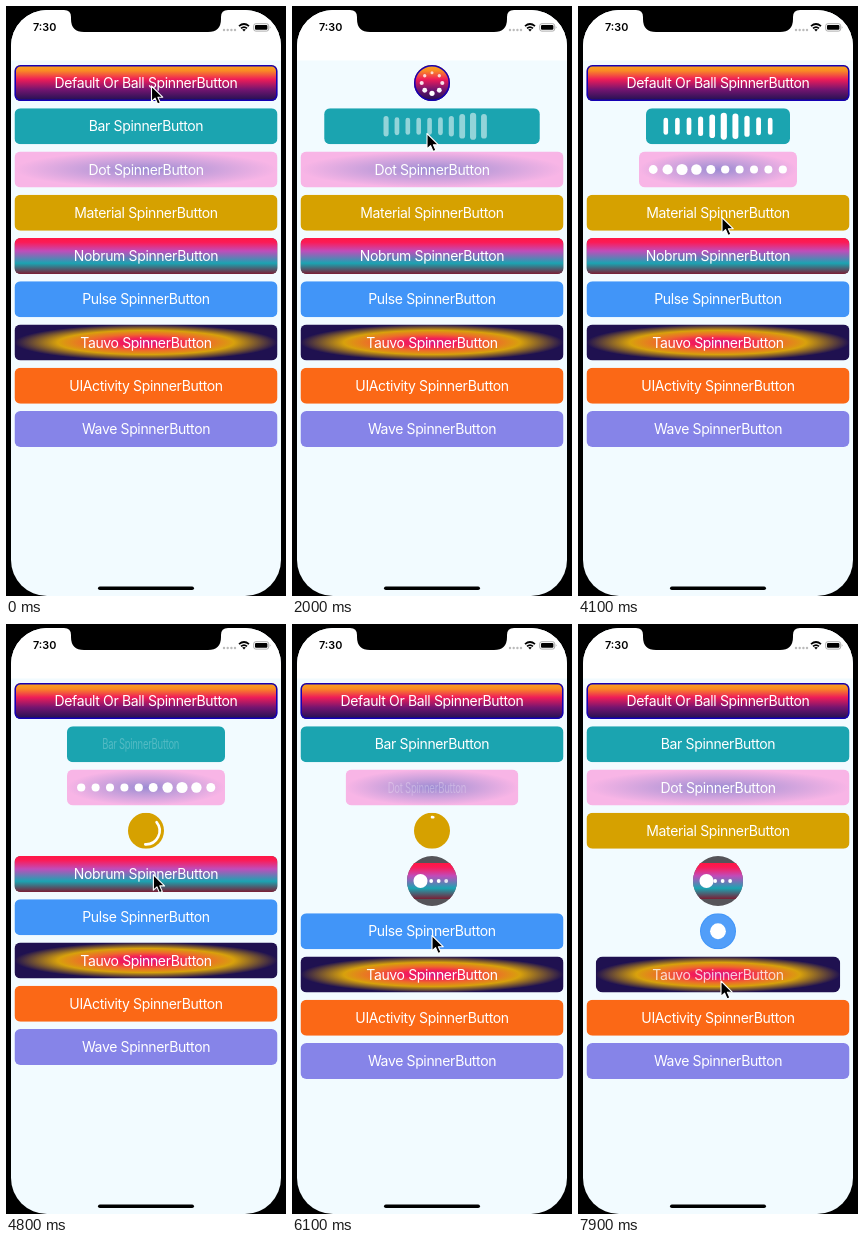
These frames come from a looping animation (280 px wide and 590 px high, 8 s). An HTML page:

```html
<!DOCTYPE html>
<html lang="en">
<head>
<meta charset="utf-8">
<title>Spinner buttons</title>
<style>
  html, body { margin: 0; width: 100%; height: 100%; overflow: hidden; background: #000; }
  svg { display: block; width: 280px; height: 590px; }
  text { font-family: Inter, Roboto, sans-serif; }
  .label { font-size: 14px; letter-spacing: -.36px; fill: #fff; text-anchor: middle; }
</style>
</head>
<body>
<svg id="stage" viewBox="0 0 280 590">
  <defs>
    <linearGradient id="sunset" x2="0" y2="1">
      <stop offset="0" stop-color="#f9a81c"/><stop offset=".16" stop-color="#f98a25"/>
      <stop offset=".4" stop-color="#ee1c58"/><stop offset=".68" stop-color="#741570"/>
      <stop offset="1" stop-color="#1d1150"/>
    </linearGradient>
    <linearGradient id="candy" x2="0" y2="1">
      <stop offset="0" stop-color="#ff1744"/><stop offset=".12" stop-color="#fb1b57"/>
      <stop offset=".36" stop-color="#c04cba"/><stop offset=".7" stop-color="#1ba4b2"/>
      <stop offset="1" stop-color="#7a1f35"/>
    </linearGradient>
    <radialGradient id="lilac">
      <stop offset="0" stop-color="#9c8bd3"/><stop offset=".35" stop-color="#bd9bd9"/>
      <stop offset="1" stop-color="#f8b5e6"/>
    </radialGradient>
    <radialGradient id="flare">
      <stop offset="0" stop-color="#d51b86"/><stop offset=".22" stop-color="#f31d58"/>
      <stop offset=".45" stop-color="#ee6a2b"/><stop offset=".67" stop-color="#d8a10c"/>
      <stop offset="1" stop-color="#1f1150"/>
    </radialGradient>
    <clipPath id="screen"><rect x="5" y="4" width="270" height="586" rx="36"/></clipPath>
  </defs>
  <rect width="280" height="590"/>
  <g clip-path="url(#screen)">
    <rect width="280" height="590" fill="#f2fbff"/>
    <rect width="280" height="54.5" fill="#fff"/>
  </g>
  <path d="M58 0V4Q65 4 65 11V13Q65 26 78 26H202Q215 26 215 13V11Q215 4 222 4V0Z"/>
  <text x="27" y="25.3" font-size="10.8" font-weight="600">7:30</text>
  <g fill="#bbb">
    <circle cx="218" cy="24" r="1.2"/><circle cx="221.7" cy="24" r="1.2"/>
    <circle cx="225.4" cy="24" r="1.2"/><circle cx="229" cy="24" r="1.2"/>
  </g>
  <g fill="none" stroke="#000" stroke-width="1.7">
    <path d="M233 20.2Q238 15.8 243 20.2M235 22.4Q238 19.8 241 22.4"/>
  </g>
  <path d="M236.2 23.6Q238 22.2 239.8 23.6L238 25.6Z"/>
  <rect x="247.7" y="17.7" width="15" height="7.4" rx="2.1" fill="none" stroke="#999" stroke-width=".8"/>
  <rect x="249" y="19" width="12.4" height="4.8" rx="1.1"/>
  <path d="M263.8 20Q265.3 21.4 263.8 22.8Z" fill="#999"/>
  <g id="buttons"></g>
  <rect x="92" y="580.5" width="96" height="3.6" rx="1.8"/>
  <path id="cursor" d="M0 0V15.5L3.6 12.2L6.1 18L8.9 16.8L6.4 11.2H11.2Z"
        stroke="#fff" stroke-width="1.1" stroke-linejoin="round"/>
</svg>
<script>
const LOOP = 8, MORPH = 0.5, BUSY = 2.9, FULL = 263, HEIGHT = 36, PITCH = 43.25, MID = 140;

const clamp = v => Math.max(0, Math.min(1, v));
const mix = (a, b, k) => a + (b - a) * k;
const wrap = (v, n) => ((v % n) + n) % n;
const polar = (r, deg) => [r * Math.cos(deg * Math.PI / 180), r * Math.sin(deg * Math.PI / 180)];

function bezier(x1, y1, x2, y2) {
  const at = (a, b, s) => 3 * a * s * (1 - s) ** 2 + 3 * b * s * s * (1 - s) + s ** 3;
  return x => {
    let lo = 0, hi = 1;
    for (let i = 0; i < 20; i++) {
      const s = (lo + hi) / 2;
      if (at(x1, x2, s) < clamp(x)) lo = s; else hi = s;
    }
    return at(y1, y2, lo);
  };
}
const easeInOut = bezier(.42, 0, .58, 1);
const strokeEase = bezier(.4, 0, .2, 1);

function add(parent, tag, attrs = {}) {
  const node = document.createElementNS('http://www.w3.org/2000/svg', tag);
  parent.append(node);
  return set(node, attrs);
}
function set(node, attrs) {
  for (const key in attrs) node.setAttribute(key, attrs[key]);
  return node;
}
const many = (n, make) => Array.from({ length: n }, (_, i) => make(i));

// Height of a bump travelling around a row of ten items.
function wave(i, center, spread) {
  const d = wrap(i - center + 5, 10) - 5;
  return Math.exp(-d * d / (spread * spread));
}

// Each spinner builds its nodes around (0,0) and returns an update(t, p).
const spinners = {
  ball(g) {
    const balls = many(8, () => add(g, 'circle'));
    return t => balls.forEach((ball, i) => {
      const [cx, cy] = polar(10.3, i * 45 - 90);
      const k = .5 + .5 * Math.cos(2 * Math.PI * (t - i / 8 - .5));
      set(ball, { cx, cy, r: mix(1.5, 2.6, k), opacity: mix(.75, 1, k) });
    });
  },
  bar(g) {
    const bars = many(10, () => add(g, 'rect'));
    return (t, p) => bars.forEach((bar, i) => {
      const k = wave(i, 8 + 8.2 * (t - 2), 1.9);
      const w = mix(4.6, 6.2, k), h = mix(17, 27, k);
      const x = (i - 4.5) * mix(10.4, 11.6, p) + 5 * (1 - p);
      set(bar, { x: x - w / 2, y: -h / 2, width: w, height: h, rx: w / 2 });
    });
  },
  dot(g) {
    const dots = many(10, i => add(g, 'circle', { cx: (i - 4.5) * 14.4 }));
    return t => dots.forEach((dot, i) =>
      set(dot, { r: mix(4, 5.6, wave(i, 7 + 7 * (t - 4.8), 1.8)) }));
  },
  arc(g) {
    const path = add(g, 'path', {
      fill: 'none', stroke: '#fff', 'stroke-width': 2.6, 'stroke-linecap': 'round'
    });
    return t => {
      const age = Math.max(0, t - 4.59), u = age % 1.93, turn = 242 * age - 90;
      const from = turn + 360 * strokeEase((u - .5) / 1.2);
      const to = Math.min(turn + 360 * strokeEase(u / .7), from + 359);
      const r = 13.6;
      set(path, { d: `M${polar(r, from)}A${r} ${r} 0 ${to - from > 180 ? 1 : 0} 1 ${polar(r, to)}` });
    };
  },
  chase(g) {
    const dots = many(4, () => add(g, 'circle', { r: 1.9 }));
    add(g, 'circle', { cx: -11.5, r: 7 });
    return t => {
      const slide = wrap((t - 6.7) / .55, 1);
      dots.forEach((dot, i) => set(dot, {
        cx: -1.5 + 7.5 * (i - slide), opacity: i === 3 ? clamp(slide * 2 - 1) : 1
      }));
    };
  },
  pulse(g) {
    const halo = add(g, 'circle');
    add(g, 'circle', { r: 7.9 });
    return t => {
      const k = wrap((t - 6.8) / 1.4, 1);
      set(halo, { r: mix(8, 19.5, k), opacity: k ? .38 * (1 - k) : 0 });
    };
  }
};

const specs = [
  { name: 'Default Or Ball', fill: 'url(#sunset)', start: .35, spinner: 'ball', lines: ['Default', 'Or Ball Spinner'] },
  { name: 'Bar', fill: '#1ba4b0', start: 1.78, spinner: 'bar', width: 144, radius: 6 },
  { name: 'Dot', fill: 'url(#lilac)', start: 3.07, spinner: 'dot', width: 158, radius: 6 },
  { name: 'Material', fill: '#d6a100', start: 4.15, spinner: 'arc' },
  { name: 'Nobrum', fill: 'url(#candy)', base: '#555459', start: 5.26, spinner: 'chase', width: 50, height: 50 },
  { name: 'Pulse', fill: '#4195f8', start: 6.22, spinner: 'pulse' },
  { name: 'Tauvo', fill: 'url(#flare)', start: 7.8 },
  { name: 'UIActivity', fill: '#fb6816' },
  { name: 'Wave', fill: '#8684e8' }
];

function makeButton(spec, index) {
  const { width = 36, height = HEIGHT, start = Infinity } = spec;
  const radius = spec.radius ?? height / 2;
  const root = add(document.getElementById('buttons'), 'g');
  const clip = add(add(root, 'clipPath', { id: 'clip' + index }), 'rect');
  const body = add(root, 'g', { 'clip-path': `url(#clip${index})` });
  const base = spec.base && add(body, 'rect', { fill: spec.base });
  const face = add(body, 'rect', { fill: spec.fill });
  const label = add(body, 'text', { class: 'label', y: 5 });
  label.textContent = spec.name + ' SpinnerButton';
  const lines = (spec.lines || []).map((line, i) => {
    const node = add(body, 'text', { class: 'label', y: i ? 14 : -4, style: 'fill:#b52a5c' });
    node.textContent = line;
    return node;
  });
  const border = spec.lines && add(root, 'rect', { fill: 'none', stroke: '#1500b4', 'stroke-width': 1.5 });
  const icon = add(body, 'g', { fill: '#fff' });
  const spin = spec.spinner && spinners[spec.spinner](icon);

  return (t, shift) => {
    const opening = easeInOut((t - start - BUSY) / MORPH);
    const closing = easeInOut((t - start) / MORPH);
    const expanding = t > start + BUSY;
    const p = expanding ? 1 - opening : closing;
    const w = mix(FULL, width, p), h = mix(HEIGHT, height, p), rx = mix(6, radius, p);
    const box = (inset = 0, tall = h) => ({
      x: inset - w / 2, y: inset - tall / 2, width: w - 2 * inset, height: tall - 2 * inset
    });
    set(root, { transform: `translate(${MID} ${59 + index * PITCH + shift + h / 2})` });
    set(clip, { ...box(), rx });
    set(face, box(0, HEIGHT));
    if (base) set(base, box());
    if (border) set(border, { ...box(.75), rx: rx - .75 });

    const folded = lines.length && expanding && w < 110;
    const alpha = expanding ? clamp(opening * 2) : clamp(1 - closing / .35);
    const squeeze = expanding ? mix(.63, 1, opening) : 1;
    set(label, {
      opacity: folded ? 0 : alpha,
      transform: `translate(${-6 * (1 - squeeze) / .37} 0) scale(${squeeze} 1)`
    });
    lines.forEach(line => set(line, { opacity: folded ? .75 : 0 }));
    set(icon, { opacity: expanding ? 0 : clamp((closing - .12) * 1.9) });
    if (spin) spin(t, p);
    return h - HEIGHT;
  };
}
const buttons = specs.map(makeButton);

// Pointer stops: time, x, y
const stops = [
  [0, 145.5, 80], [.6, 145.5, 80], [1.4, 135, 127.5], [2.2, 135, 127.5],
  [2.7, 142, 170], [3.1, 142, 170], [3.38, 144, 211.5], [4.2, 144, 211.5],
  [4.75, 147.5, 250.5], [5.2, 142, 258.5], [5.6, 142, 258.5], [6.1, 140, 311.5],
  [6.9, 140, 311.5], [7.5, 143, 357], [8, 143, 357]
];
const cursor = document.getElementById('cursor');

function moveCursor(t) {
  const i = stops.findIndex(stop => stop[0] > t);
  const [t0, x0, y0] = stops[i - 1], [t1, x1, y1] = stops[i];
  const k = easeInOut((t - t0) / (t1 - t0));
  set(cursor, { transform: `translate(${mix(x0, x1, k)} ${mix(y0, y1, k)})` });
}

function render(now) {
  const t = Math.floor(now / 100 + 1e-6) % (LOOP * 10) / 10;
  let shift = 0;
  for (const update of buttons) shift += update(t, shift);
  moveCursor(t);
}

let origin;
function tick(now) {
  origin ??= now;
  render(now - origin);
  requestAnimationFrame(tick);
}
render(0);
requestAnimationFrame(tick);
</script>
</body>
</html>
```
